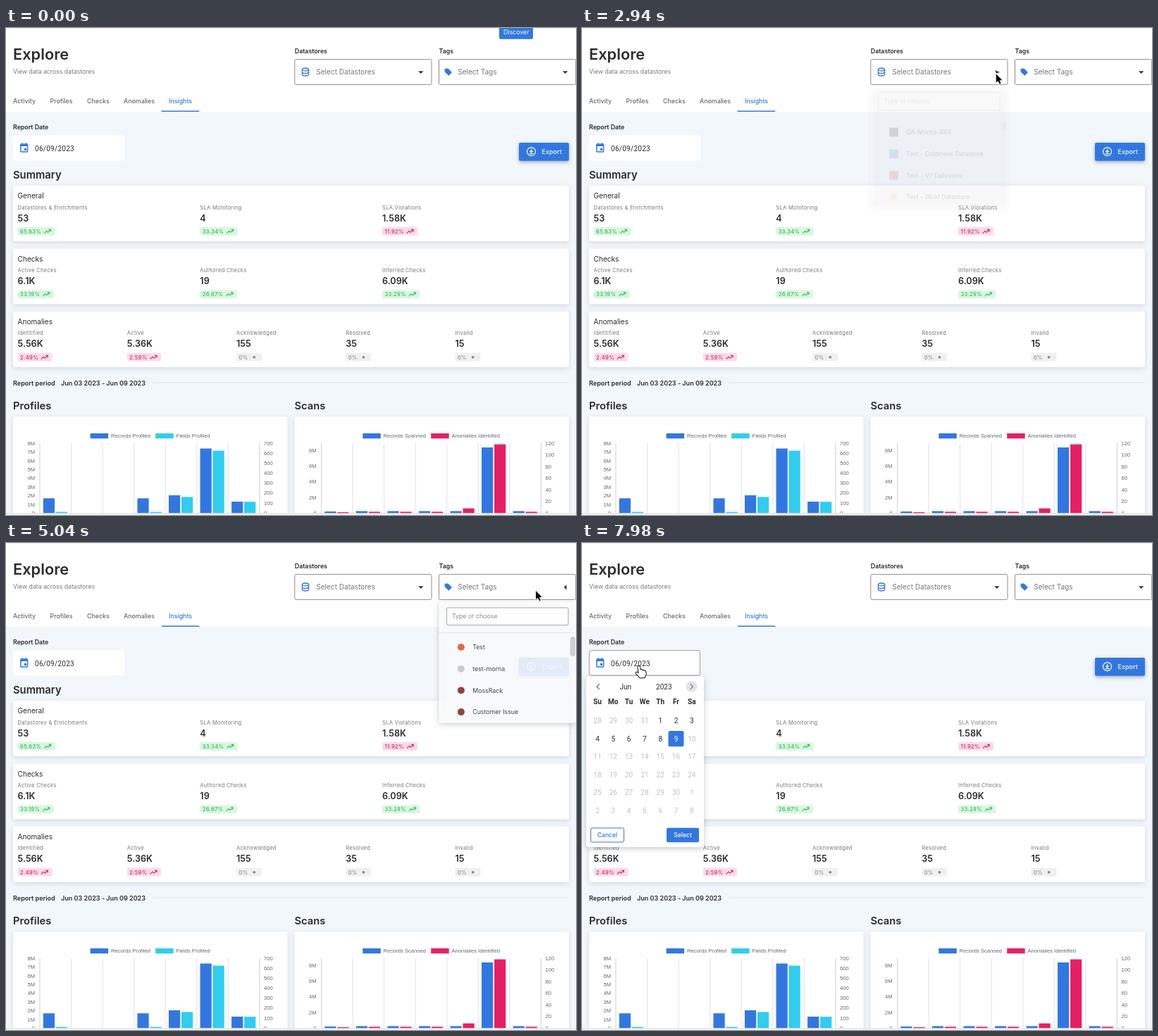
An HTML page with a canvas for the animation above (8000 ms loop, 809 px wide and 692 px high).

```html
<!DOCTYPE html>
<html lang="en">
<head>
<meta charset="utf-8">
<title>Explore insights</title>
<style>
  html, body { margin: 0; width: 809px; height: 692px; overflow: hidden; background: #fff; }
  canvas { position: absolute; left: 0; top: 0; }
</style>
</head>
<body>
<canvas id="page" width="809" height="692"></canvas>
<canvas id="live" width="809" height="692"></canvas>
<script>
const LOOP = 8000;
const BLUE = '#3277e1', DARK = '#2a2b2d', GREY = '#757779', CYAN = '#30cdef', PINK = '#e91e63';
const INTER = 'Inter, sans-serif', ROBOTO = 'Roboto, sans-serif', ARIAL = '"Liberation Sans", sans-serif';
const layer = id => document.getElementById(id).getContext('2d');
const live = layer('live');
let ctx = layer('page');

// ---- drawing helpers ----
function text(str, x, y, { size = 8.8, color = DARK, weight = 400, font = INTER, gap = 0, align = 'left' } = {}) {
  ctx.font = `${weight} ${size}px ${font}`;
  ctx.letterSpacing = gap + 'px';
  ctx.textAlign = align;
  ctx.fillStyle = color;
  ctx.fillText(str, x, y);
  return ctx.measureText(str).width;
}
function rect(x, y, w, h, color) {
  ctx.fillStyle = color;
  ctx.fillRect(x, y, w, h);
}
function box(x, y, w, h, r, fill, stroke, line = 1) {
  ctx.beginPath();
  ctx.roundRect(x, y, w, h, r);
  if (fill) { ctx.fillStyle = fill; ctx.fill(); }
  if (stroke) { ctx.strokeStyle = stroke; ctx.lineWidth = line; ctx.stroke(); }
}
function raised(x, y, w, h, r, fill, blur = 7, dark = 0.16) {
  ctx.save();
  ctx.shadowColor = `rgba(40,60,80,${dark})`;
  ctx.shadowBlur = blur;
  ctx.shadowOffsetY = 2;
  box(x, y, w, h, r, fill);
  ctx.restore();
}
function dot(x, y, r, color) {
  ctx.beginPath();
  ctx.arc(x, y, r, 0, 7);
  ctx.fillStyle = color;
  ctx.fill();
}
function shape(d, x, y, { fill, stroke, line = 1 }) {
  const path = new Path2D(d);
  ctx.save();
  ctx.translate(x, y);
  ctx.lineJoin = ctx.lineCap = 'round';
  if (stroke) { ctx.strokeStyle = stroke; ctx.lineWidth = line; ctx.stroke(path); }
  if (fill) { ctx.fillStyle = fill; ctx.fill(path); }
  ctx.restore();
}

// ---- static page ----
const TONES = { up: ['#d9f7e0', '#32b85b'], bad: ['#fbdbe5', '#d4225e'], flat: ['#f0f0f0', '#8b8b8b'] };

function chip(label, x, y, tone) {
  const [back, ink] = TONES[tone];
  const style = { size: 7.55, weight: 500, gap: 0.3, color: ink };
  const w = text(label, x + 3.5, y + 8.7, style);
  box(x, y, w + 23, 11.8, 2.5, back);
  text(label, x + 3.5, y + 8.7, style);
  const left = x + w + 8;
  if (tone === 'flat') dot(left + 4.3, y + 6, 1.9, ink);
  else shape('M0 8.3L3 5.3L5 7.3L9 3.5M6.3 3.4H9V6.1', left, y, { stroke: ink, line: 1.1 });
}

function summaryCard(title, y, step, cells) {
  raised(10, y, 789, 79, 2.5, '#fff');
  text(title, 16.6, y + 18.2, { size: 10.05 });
  cells.forEach(([label, value, change, tone], i) => {
    const x = 16.6 + i * step;
    text(label, x, y + 33.5, { size: 7.55, color: GREY, gap: 0.3 });
    text(value, x, y + 50.6, { size: 12.6, weight: 600 });
    chip(change, x, y + 59, tone);
  });
}

function chart({ title, x, grid, left, right, legend, tops }) {
  const small = { size: 7.6, color: '#666', font: ARIAL };
  text(title, x, 542, { size: 14.75, weight: 600 });
  raised(x, 552, 389.5, 160, 2.5, '#fff');
  legend.forEach(([label, lx, color]) => {
    rect(lx, 576, 25.5, 7.3, color);
    text(label, lx + 29.3, 582.4, small);
  });
  for (let i = 0; i < 8; i++) rect(grid + i * 44.55, 590, 1, 99, i % 7 ? '#e2e2e2' : '#cfcfcf');
  left.labels.forEach((s, i) => text(s, grid - 6.5, left.y + i * left.step + 2.7, { ...small, align: 'right' }));
  right.labels.forEach((s, i) => text(s, grid + 318.5, 592.7 + i * right.step, small));
  tops.forEach((list, series) => list.forEach((top, day) =>
    rect(grid + 5.3 + day * 44.55 + series * 18, top, 16.2, 690 - top, legend[series][2])));
}

const countdown = (from, step, unit = '') =>
  Array.from({ length: from / step + 1 }, (_, i) => (from - i * step || 0) + (from - i * step ? unit : ''));

function selectBox(label, hint, x) {
  text(label, x, 36.4, { weight: 600 });
  box(x, 44.6, 194.2, 35.8, 2, '#fff', '#8d8d8d');
  text(hint, x + (label === 'Tags' ? 26.7 : 30.5), 66.3, { size: 10.05, color: GREY });
}

function drawPage() {
  rect(0, 0, 809, 692, '#f2f7fc');
  rect(0, 0, 809, 119, '#fff');
  rect(0, 0, 809, 1, '#ededed');
  text('Explore', 10, 45, { size: 21.8, weight: 600 });
  text('View data across datastores', 10, 64.7, { color: GREY, size: 8.7 });
  [['Activity', 10], ['Profiles', 62.5], ['Checks', 115], ['Anomalies', 167], ['Insights', 231]].forEach(([s, x]) =>
    text(s, x, 106.8, { weight: 500, color: s === 'Insights' ? BLUE : '#66686b' }));
  rect(220.7, 117.5, 53.5, 1.5, BLUE);

  selectBox('Datastores', 'Select Datastores', 409.8);
  selectBox('Tags', 'Select Tags', 614.5);
  shape('M-4.6 -3.6A4.6 1.9 0 0 1 4.6 -3.6V3.6A4.6 1.9 0 0 1 -4.6 3.6ZM-4.6 -3.6A4.6 1.9 0 0 0 4.6 -3.6M-4.6 0A4.6 1.9 0 0 0 4.6 0',
    425, 62.5, { stroke: BLUE, line: 1.3 });
  shape('M-4 -4.2H0L5 0.8L0.8 5L-4.2 0Z', 627.5, 62.3, { fill: BLUE, stroke: BLUE });

  text('Report Date', 10, 144.2, { weight: 600 });
  box(10, 152.5, 158, 35.8, 2.5, '#fff');
  box(20.8, 165.3, 9.8, 10.6, 1, null, BLUE, 1.5);
  rect(20.5, 164.8, 10.4, 3.2, BLUE);
  rect(22.2, 163.2, 1.5, 2, BLUE);
  rect(27.6, 163.2, 1.5, 2, BLUE);
  rect(26, 171, 3, 3, BLUE);
  text('06/09/2023', 41, 174.5, { size: 10.05, font: ROBOTO, gap: 0.25 });

  raised(728, 163, 71, 25.7, 2, BLUE, 5, 0.4);
  shape('M6 0A6 6 0 1 1 -6 0A6 6 0 1 1 6 0M0 -3.2V1M-2 -0.8L0 1.2L2 -0.8M-2.6 3.1H2.6', 745.5, 175.6, { stroke: '#fff', line: 1.2 });
  text('Export', 760.5, 178.8, { color: '#fff', weight: 500, gap: 0.15 });

  text('Summary', 10, 214.4, { size: 14.8, weight: 600 });
  summaryCard('General', 224, 258.7, [
    ['Datastores & Enrichments', '53', '65.63%', 'up'],
    ['SLA Monitoring', '4', '33.34%', 'up'],
    ['SLA Violations', '1.58K', '11.92%', 'bad']]);
  summaryCard('Checks', 313.4, 258.7, [
    ['Active Checks', '6.1K', '33.19%', 'up'],
    ['Authored Checks', '19', '26.67%', 'up'],
    ['Inferred Checks', '6.09K', '33.29%', 'up']]);
  summaryCard('Anomalies', 402.8, 155.2, [
    ['Identified', '5.56K', '2.49%', 'bad'],
    ['Active', '5.36K', '2.59%', 'bad'],
    ['Acknowledged', '155', '0%', 'flat'],
    ['Resolved', '35', '0%', 'flat'],
    ['Invalid', '15', '0%', 'flat']]);

  text('Report period', 10, 507.6, { size: 9.05, weight: 600 });
  text('Jun 03 2023 - Jun 09 2023', 78, 507.6, { size: 9.05, weight: 600 });
  rect(208, 503.5, 591, 1, '#dde3e8');

  chart({
    title: 'Profiles', x: 10, grid: 47.5,
    left: { labels: countdown(8, 1, 'M'), y: 590, step: 12.4 },
    right: { labels: countdown(700, 100), step: 14.15 },
    legend: [['Records Profiled', 119.6, BLUE], ['Fields Profiled', 212.2, CYAN]],
    tops: [[668.3, 690, 690, 668.3, 664, 597.5, 673], [687.6, 690, 690, 687.6, 666.4, 600.6, 673.2]]
  });
  chart({
    title: 'Scans', x: 409.5, grid: 447,
    left: { labels: countdown(8, 2, 'M'), y: 600.5, step: 22.1 },
    right: { labels: countdown(120, 20), step: 16.5 },
    legend: [['Records Scanned', 506.3, BLUE], ['Anomalies Identified', 603.2, PINK]],
    tops: [[687, 686.5, 686.5, 686.5, 686.5, 596, 686.5], [688, 687.4, 687.4, 687.4, 682.6, 591.6, 687.4]]
  });
  rect(0, 689.3, 809, 3, '#fff');
  rect(0, 689.6, 809, 1, '#cfcfcf');
}

// ---- popups ----
const MENUS = [
  { x: 409.8, arrow: 588.8, open: 2920, close: 3760, thumb: 14, textX: 50.2, iconX: 32.8, items: [
    ['QA-Morna-XK4', '#151c17', 'square'], ['Test - Coldmere Datastore', '#2f6fae', 'square'],
    ['Test - V7 Datastore', '#c0392f', 'square'], ['Test - Wold Datastore', '#efd348', 'round']] },
  { x: 614.5, arrow: 793.7, open: 4590, close: 4960, thumb: 28, textX: 47.7, iconX: 31.7, items: [
    ['Test', '#dd5428', 'round'], ['test-morna', '#c3c3cb', 'round'],
    ['MossRack', '#80291f', 'round'], ['Customer Issue', '#80291f', 'round']] }
];

function drawMenu({ x, open, close, thumb, textX, iconX, items }, t) {
  raised(x, 84, 194.5, 171.8, 2.5, '#fff', 8, 0.28);
  const focused = t > open + 100 && t < close - 120;
  box(x + 11, 92, 172.5, 24.7, 2, '#fff', focused ? BLUE : '#999', focused ? 1.6 : 1);
  text('Type or choose', x + 18.4, 107.4, { color: '#7d7d7d' });
  if (focused && (t - open - 100) % 1000 < 500) rect(x + 18.2, 98.5, 0.9, 11.5, '#222');
  rect(x, 127, 194.5, 1, '#e3e3e3');
  box(x + 186.3, 133, 7.2, thumb, 3.5, '#c9c9c9');
  items.forEach(([label, color, kind], i) => {
    const y = 148 + i * 30.7;
    if (kind === 'round') dot(x + iconX - 0.3, y, 5, color);
    else rect(x + iconX - 6.3, y - 6.3, 12.6, 12.6, color);
    text(label, x + textX, y + 3.3);
  });
}

function drawCalendar() {
  const mid = { size: 10.05, font: ROBOTO, align: 'center' };
  raised(6, 189.5, 167, 242.5, 2.5, '#fff', 8, 0.28);
  dot(155.5, 204, 8, '#e4e4e4');
  shape('M1.6 -3.6L-2 0L1.6 3.6', 23, 204, { stroke: '#666', line: 1.1 });
  shape('M-1.6 -3.6L2 0L-1.6 3.6', 155.5, 204, { stroke: '#777', line: 1.1 });
  text('Jun', 61.7, 207.6, mid);
  text('2023', 116.3, 207.6, mid);
  ['Su', 'Mo', 'Tu', 'We', 'Th', 'Fr', 'Sa'].forEach((s, i) => text(s, 22 + i * 22.3, 229.2, { ...mid, weight: 700 }));
  for (let i = 0; i < 42; i++) {
    const day = i - 3, x = 22 + i % 7 * 22.3, y = 252.6 + Math.floor(i / 7) * 25.5;
    const shown = day < 1 ? day + 31 : day > 30 ? day - 30 : day;
    if (day === 9) box(x - 11, y - 11.2, 22, 22.4, 2.5, BLUE);
    text(shown, x, y + 3.6, { ...mid, color: day === 9 ? '#fff' : day > 0 && day < 9 ? DARK : '#c2c2c2' });
  }
  box(12.5, 405, 47, 20, 2, '#fff', BLUE);
  box(120, 404.7, 46, 20.5, 2, BLUE);
  text('Cancel', 36, 418.2, { size: 8.6, weight: 500, color: BLUE, align: 'center' });
  text('Select', 143, 418.2, { size: 8.6, weight: 500, color: '#fff', align: 'center' });
}

// ---- pointer ----
const TRACK = [
  [250, 724, -20], [1050, 250, 36], [1100, 250, 36], [1470, 619, 70.5], [2430, 619, 70.5],
  [2680, 587.7, 65.3], [3850, 587.7, 65.3], [4400, 752, 68], [5060, 752, 68], [5260, 770, 166],
  [5600, 35.7, 254.5], [5720, 35.7, 254.5], [5900, 4, 330], [6100, 300, 390], [6180, 356, 362],
  [6900, 80.7, 175], [LOOP, 80.7, 175]
];
const CLICKS = [[2790, 587, 72.5], [3630, 587, 72.5], [4470, 751, 74.5], [4830, 751, 74.5], [7050, 76.5, 171.5]];
const ARROW = 'M0 0V12.3L2.8 9.7L4.9 14.3L6.9 13.4L4.9 9H8.8Z';
const BEAM = 'M-3 -7.5Q0 -7.5 0 -6Q0 -7.5 3 -7.5M0 -6V6M-3 7.5Q0 7.5 0 6Q0 7.5 3 7.5M-1.5 2.5H1.5';
const HAND = 'M-1.4 1Q0 -1.2 1.4 1L2.2 5.5Q3.7 4.4 4.7 6Q6.2 5 7.2 6.8Q9.2 6 9.7 8.5L10 11Q10 13 8.8 14L8.5 16L1.5 16.4Q0 14 -3.8 10.5Q-4.6 8.2 -2.4 8.8L0 10.4Z';

const ramp = (t, start, span) => Math.min(1, Math.max(0, (t - start) / span));
const ease = k => k * k * (3 - 2 * k);

function pointerAt(t) {
  const i = TRACK.findIndex(key => key[0] > t);
  const [t0, x0, y0] = TRACK[i - 1], [t1, x1, y1] = TRACK[i];
  const k = ease(ramp(t, t0, t1 - t0));
  return [x0 + (x1 - x0) * k, y0 + (y1 - y0) * k];
}

function drawPointer(t) {
  for (const [start, x, y] of CLICKS) {
    if (t < start || t > start + 135) continue;
    ctx.beginPath();
    ctx.arc(x, y, 29.4, 0, 7);
    ctx.strokeStyle = '#111';
    ctx.lineWidth = 1.8;
    ctx.stroke();
  }
  if (t < TRACK[0][0]) return;
  const [x, y] = pointerAt(t);
  if (t > 6840) shape(HAND, x, y, { fill: '#fff', stroke: '#111', line: 2 });
  else if (t > 5560 && t < 5760) {
    shape(BEAM, x, y, { stroke: '#fff', line: 2.6 });
    shape(BEAM, x, y, { stroke: '#111', line: 1.3 });
  } else shape(ARROW, x, y, { fill: '#000', stroke: '#fff', line: 1.6 });
}

function faded(alpha, draw) {
  if (alpha <= 0) return;
  ctx.globalAlpha = alpha;
  draw();
  ctx.globalAlpha = 1;
}

function render(t) {
  ctx.clearRect(0, 0, 809, 692);
  faded(1 - ramp(t, 270, 140), () => {
    box(700, -8, 48, 23.8, 2, BLUE);
    text('Discover', 706, 9.2, { color: '#fff' });
  });
  if (t > 6840) box(10.3, 152.7, 157.3, 35.4, 2.5, null, '#999');
  for (const menu of MENUS) {
    ctx.save();
    ctx.translate(menu.arrow, 63);
    ctx.rotate(Math.PI * (ramp(t, menu.open, 160) - ramp(t, menu.close, 160)));
    shape('M-3.6 -1.8H3.6L0 1.9Z', 0, 0, { fill: '#333' });
    ctx.restore();
    faded(ramp(t, menu.open, 150) - ramp(t, menu.close + 55, 190), () => drawMenu(menu, t));
  }
  faded(ramp(t, 7180, 150), drawCalendar);
  drawPointer(t);
}

drawPage();
ctx = live;
const begin = performance.now();
(function tick() {
  render((performance.now() - begin) % LOOP);
  requestAnimationFrame(tick);
})();
</script>
</body>
</html>
```
